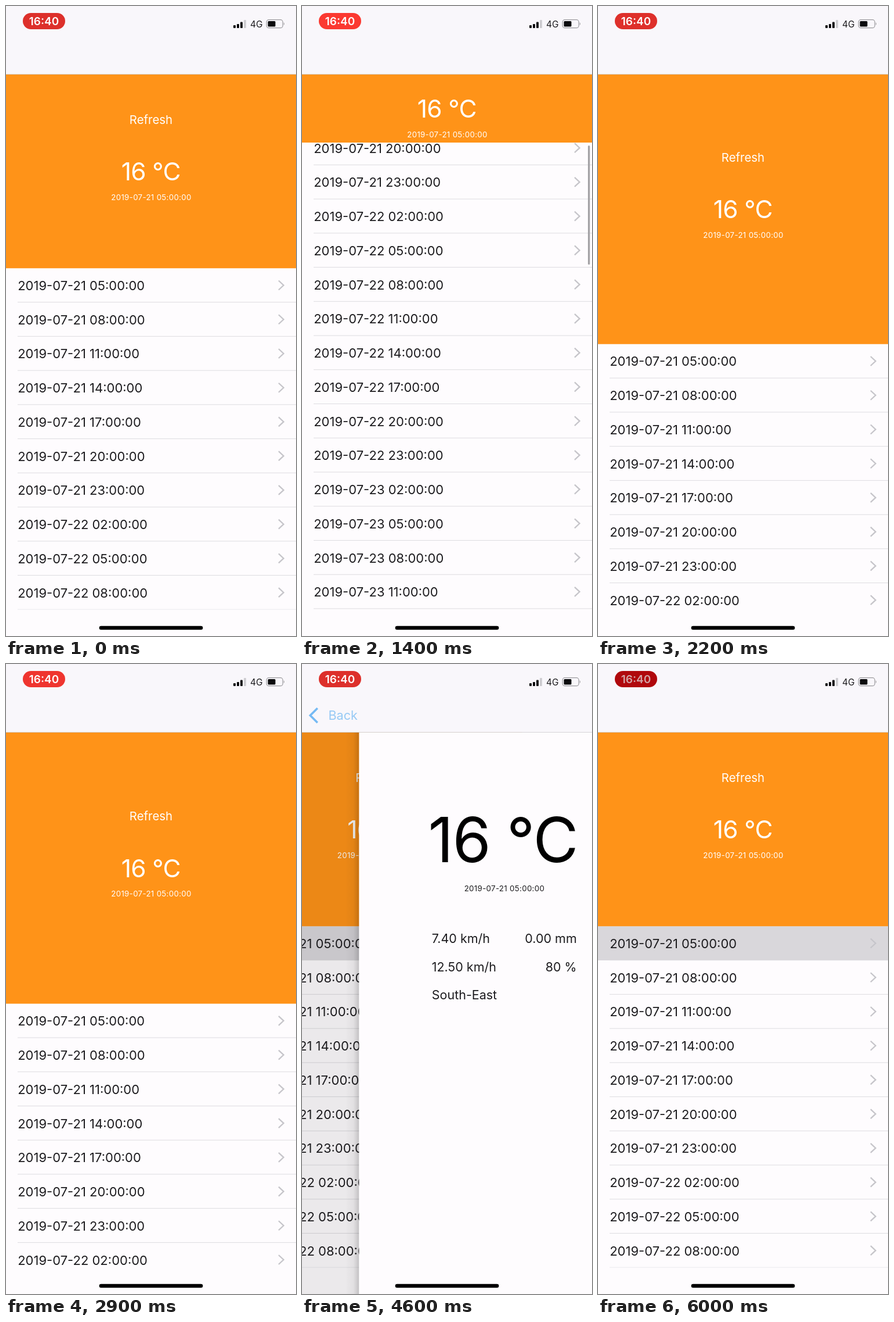
An HTML page for the animation above (6100 ms loop, 500x1084 px).

```html
<!DOCTYPE html>
<html lang="en">
<head>
<meta charset="utf-8">
<title>Forecast list</title>
<style>
  html, body { margin: 0; width: 100%; height: 100%; overflow: hidden; background: #fefcfe; }
  svg { display: block; width: 100%; height: 100%; }
  text { font-family: Inter, Roboto, sans-serif; font-size: 22px; fill: #1d1c1f; }
  .mid { text-anchor: middle; }
  .end { text-anchor: end; }
  .white { fill: #fff; }
  .big { letter-spacing: -.015em; }
  .stamp { font-size: 13.35px; letter-spacing: .3px; }
  .detail { font-size: 21.5px; }
  .line { fill: none; stroke-linecap: butt; stroke-linejoin: miter; }
</style>
</head>
<body>
<svg viewBox="0 0 500 1084" preserveAspectRatio="none">
  <defs>
    <clipPath id="page"><rect y="117.5" width="500" height="966.5"/></clipPath>
    <clipPath id="table"><rect y="117.5" width="500" height="921.1"/></clipPath>
    <clipPath id="headClip"><rect id="headMask" y="117.5" width="500" height="333.7"/></clipPath>
    <linearGradient id="edge">
      <stop offset="0" stop-color="#000" stop-opacity="0"/>
      <stop offset=".6" stop-color="#000" stop-opacity=".04"/>
      <stop offset="1" stop-color="#000" stop-opacity=".17"/>
    </linearGradient>
  </defs>

  <rect width="500" height="1084" fill="#fefcfe"/>

  <g clip-path="url(#page)">
    <g id="list">
      <g clip-path="url(#table)">
        <g id="rows"><rect id="picked" width="500" height="58.74" fill="#d9d7db"/></g>
        <rect id="bar" x="493" width="3.4" height="205" rx="1.7" fill="#a5a4a7"/>
      </g>
      <g clip-path="url(#headClip)">
        <rect y="117.5" width="500" height="700" fill="#ff9318"/>
        <g id="headText">
          <text class="mid white" x="250" y="202.5" style="font-size:20.4px">Refresh</text>
          <text class="mid white big" x="249.8" y="300" style="font-size:42.5px">16 °C</text>
          <text class="mid white stamp" x="250.5" y="333.8">2019-07-21 05:00:00</text>
        </g>
      </g>
    </g>
    <rect id="dim" y="117.5" width="500" height="966.5"/>
    <g id="detail">
      <rect x="-24" y="117.5" width="24" height="966.5" fill="url(#edge)"/>
      <rect y="117.5" width="500" height="966.5" fill="#fefcfe"/>
      <text class="mid big" x="248" y="341" style="font-size:107px;fill:#000">16 °C</text>
      <text class="mid stamp" x="250.6" y="391">2019-07-21 05:00:00</text>
      <text class="detail" x="125.4" y="480.3">7.40 km/h</text>
      <text class="detail" x="125.4" y="528.8">12.50 km/h</text>
      <text class="detail" x="125.4" y="577.3">South-East</text>
      <text class="detail end" x="375.4" y="480.3">0.00 mm</text>
      <text class="detail end" x="375.4" y="528.8">80 %</text>
    </g>
  </g>

  <rect width="500" height="117.5" fill="#f9f7fb"/>
  <rect y="117.2" width="500" height=".6" fill="#000" opacity=".25"/>
  <g id="nav">
    <path id="arrow" class="line" d="M26.7 76 L14.2 88.5 L26.7 101" stroke="#1f93ee" stroke-width="3.6"/>
    <text id="back" y="96" style="font-size:21.6px;fill:#1f93ee">Back</text>
  </g>

  <rect id="pill" x="29" y="12" width="73" height="28" rx="14"/>
  <text id="clock" class="mid" x="65.5" y="33" style="font-size:19px;font-weight:600">16:40</text>
  <g fill="#0c0c0e">
    <rect x="392" y="33" width="4" height="5" rx="1"/>
    <rect x="398" y="31" width="4" height="7" rx="1"/>
    <rect x="404" y="27.5" width="4" height="10.5" rx="1"/>
    <rect x="410" y="24" width="4" height="14" rx="1" fill="#cfced2"/>
    <rect x="451.5" y="26" width="13" height="9.5" rx="1.5"/>
  </g>
  <text x="421" y="36.8" style="font-size:15.4px">4G</text>
  <rect x="449.2" y="23.7" width="28" height="14" rx="4" fill="none" stroke="#9b9a9e" stroke-width="1.2"/>
  <path d="M478.8 28 q2.4 2.7 0 5.4 z" fill="#9b9a9e"/>
  <rect x="160.7" y="1066.7" width="178.7" height="6.6" rx="3.3" fill="#000"/>
</svg>

<script>
const LOOP = 6100, STEP = 100, W = 500;
const TOP = 117.5, HEAD = 333.7, HEAD_MIN = 117.5, PITCH = 58.74;
const $ = id => document.getElementById(id);
const clamp = (v, lo = 0, hi = 1) => Math.min(hi, Math.max(lo, v));
const set = (id, attrs) => { for (const k in attrs) $(id).setAttribute(k, attrs[k]); };
const shift = (id, x, y) => set(id, { transform: `translate(${x} ${y})` });

function add(parent, tag, attrs, text) {
  const el = document.createElementNS("http://www.w3.org/2000/svg", tag);
  for (const k in attrs) el.setAttribute(k, attrs[k]);
  if (text) el.textContent = text;
  parent.appendChild(el);
}

// Three-hourly forecast rows
for (let i = 0; i < 24; i++) {
  const hour = 5 + 3 * i, y = i * PITCH;
  const label = `2019-07-${21 + Math.floor(hour / 24)} ${String(hour % 24).padStart(2, "0")}:00:00`;
  add($("rows"), "text", { x: 20.2, y: y + 37.8 }, label);
  add($("rows"), "path", { class: "line", d: `M470 ${y + 21.3} l8.6 8 l-8.6 8`, stroke: "#c6c5ca", "stroke-width": 2.3 });
  add($("rows"), "rect", { x: 20, y: y + PITCH - 0.8, width: 480, height: 1, fill: "#dddce0" });
}

// Scroll offset over time; negative is the pull past the top
const SCROLL = [[0, 0], [150, 0], [700, 262], [1200, 524], [1400, 530], [1550, 530],
  [2200, -130.5], [2500, -180], [2750, -180], [3200, 0], [LOOP, 0]];
const slope = i => (SCROLL[i + 1][1] - SCROLL[i][1]) / (SCROLL[i + 1][0] - SCROLL[i][0]);
function tangent(i) {
  if (i === 0 || i === SCROLL.length - 1) return 0;
  const a = slope(i - 1), b = slope(i);
  return a * b > 0 ? 2 * a * b / (a + b) : 0;
}
function scrollAt(t) {
  let i = 0;
  while (i < SCROLL.length - 2 && t >= SCROLL[i + 1][0]) i++;
  const [t0, a] = SCROLL[i], [t1, b] = SCROLL[i + 1];
  const d = t1 - t0, u = (t - t0) / d, v = 1 - u;
  return a * (1 + 2 * u) * v * v + b * u * u * (3 - 2 * u)
    + d * (tangent(i) * u * v * v - tangent(i + 1) * u * u * v);
}

// Left edge of the detail page: spring push, then swipe back
const PUSH = 3578.5, POP = 4344, POP_END = 5244;
function detailX(t) {
  if (t < PUSH || t >= POP_END) return W;
  if (t < POP) {
    const k = 18 * (t - PUSH) / 1000;
    return W * (1 + k) * Math.exp(-k);
  }
  const p = (t - POP) / (POP_END - POP);
  return W * p * p * (3 - 2 * p);
}

function drawPill(t) {
  const pressed = t >= 5900;
  const glow = (1 - Math.cos(2 * Math.PI * t / 2300)) / 2;
  const mix = (a, b) => Math.round(a + (b - a) * glow);
  set("pill", { fill: pressed ? "#b0080c" : `rgb(${mix(221, 255)},${mix(48, 58)},${mix(43, 50)})` });
  $("clock").style.fill = pressed ? "#d3a5a6" : "#fff";
}

function draw(t) {
  const s = scrollAt(t), height = Math.max(HEAD_MIN, HEAD - s);
  shift("rows", 0, TOP + HEAD - s);
  set("headMask", { height });
  shift("headText", 0, (height - HEAD) / 2);
  set("bar", { y: 121.4 + 0.224 * Math.max(0, s) });
  set("picked", { opacity: t >= 3500 ? 1 : 0 });

  const x = detailX(t), shown = 1 - x / W;
  shift("list", -0.3 * (W - x), 0);
  set("dim", { opacity: 0.095 * shown });
  shift("detail", x, 0);
  set("detail", { display: x < W ? "inline" : "none" });
  set("nav", { display: x < W ? "inline" : "none" });

  const popping = t >= POP;
  set("arrow", { opacity: clamp(popping ? 1 - 2 * x / W : 1 - x / 1500) });
  set("back", { x: 30.2 + 0.155 * x, opacity: clamp(popping ? 1 - 2.8 * x / W : shown) });
  drawPill(t);
}

function tick() {
  draw(Math.floor(performance.now() % LOOP / STEP) * STEP);
  requestAnimationFrame(tick);
}
tick();
</script>
</body>
</html>
```
